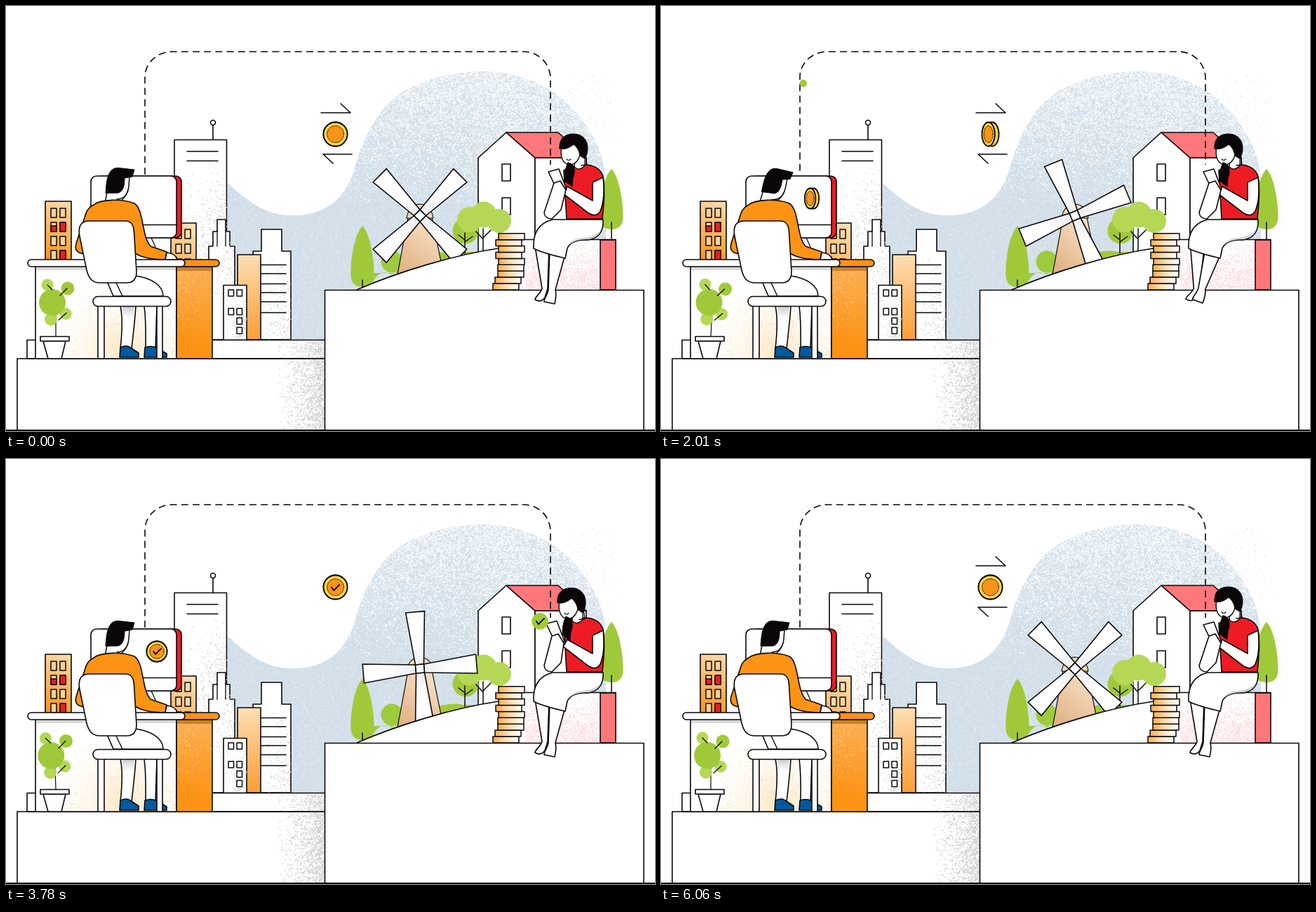
An HTML page with a canvas for the animation above (6.09 s loop, 925 px wide and 605 px high).

```html
<!DOCTYPE html>
<html lang="en">
<head>
<meta charset="utf-8">
<title>Town and country transfer</title>
<style>
html, body { margin: 0; width: 100%; height: 100%; overflow: hidden; background: #fff }
canvas { display: block }
</style>
</head>
<body>
<canvas id="stage" width="925" height="605"></canvas>
<script>
const LOOP = 6090, W = 925, H = 605, TAU = Math.PI * 2;
const INK = '#0b0708', ORANGE = '#fc9314', PEACH = '#fdd9a6', RED = '#ed1c24', PINK = '#ff777b';
const LEAF = '#a0c93a', LIME = '#b4d855', BLUE = '#d3e0ea', SHOE = '#005a9e';
const main = document.getElementById('stage').getContext('2d');
let c = main, seed = 7;

const rnd = () => (seed = seed * 16807 % 2147483647) / 2147483647;

function paint(p, fill, line = 1.6) {
  if (fill) { c.fillStyle = fill; c.fill(p); }
  if (line) { c.lineWidth = line; c.strokeStyle = INK; c.stroke(p); }
}
const path = (d, fill, line) => paint(new Path2D(d), fill, line);
function box(x, y, w, h, fill = '#fff', r = 0, line) {
  const p = new Path2D();
  p.roundRect(x, y, w, h, r);
  paint(p, fill, line);
}
function oval(x, y, rx, ry, fill, line = 0) {
  const p = new Path2D();
  p.ellipse(x, y, rx, ry, 0, 0, TAU);
  paint(p, fill, line);
}
const dot = (x, y, r, fill, line) => oval(x, y, r, r, fill, line);
function fade(x0, y0, x1, y1, ...colors) {
  const g = c.createLinearGradient(x0, y0, x1, y1);
  colors.forEach((col, i) => g.addColorStop(i / (colors.length - 1), col));
  return g;
}
function grain(n, x, y, w, h, color, keep) {
  c.fillStyle = color;
  for (let i = 0; i < n; i++) {
    const u = rnd(), v = rnd(), s = .8 + rnd() * .8;
    if (rnd() < keep(u, v)) c.fillRect(x + u * w, y + v * h, s, s);
  }
}
function group(fn, x = 0, y = 0, deg = 0) {
  c.save();
  c.translate(x, y);
  c.rotate(deg * TAU / 360);
  fn();
  c.restore();
}
const turn = (deg, x, y, fn) => group(() => { c.translate(-x, -y); fn(); }, x, y, deg);
function layer(fn) {
  const cv = document.createElement('canvas');
  cv.width = W; cv.height = H;
  c = cv.getContext('2d');
  c.lineJoin = c.lineCap = 'round';
  fn();
  c = main;
  return cv;
}
// Eased value from a flat list of time, value pairs
function key(t, ...k) {
  if (t <= k[0]) return k[1];
  for (let i = 0; i + 2 < k.length; i += 2) {
    if (t < k[i + 2]) {
      const u = (t - k[i]) / (k[i + 2] - k[i]);
      return k[i + 1] + (k[i + 3] - k[i + 1]) * u * u * (3 - 2 * u);
    }
  }
  return k[k.length - 1];
}

function sky() {
  const cloud = new Path2D('M316 252C345 278 370 298 408 298C450 298 480 280 495 237C508 192 515 180 530 157C555 118 610 93 680 93C740 93 790 120 820 160C845 195 855 220 855 260V404H455V475H316Z');
  c.save();
  c.clip(cloud);
  paint(cloud, BLUE, 0);
  grain(42000, 480, 92, 376, 190, '#fff', (u, v) => .75 * (1 - v) ** 1.2 + .15 * u);
  grain(12000, 316, 252, 540, 223, '#c8d5de', () => .3);
  grain(12000, 316, 252, 540, 223, '#e6eff5', () => .4);
  c.restore();
  grain(160, 800, 98, 72, 95, '#dfe8ef', u => 1 - u * .6);
}

function city() {
  const shade = (x, y, w, h, n) => grain(n, x, y, w, h, '#cfcfcf', (u, v) => u * v);
  const panes = (xs, ys, w, h, fill) => xs.forEach(x => ys.forEach(y => box(x, y, w, h, fill, 0, 1.5)));

  box(56, 278, 37, 84, fade(93, 278, 60, 362, '#fcdcae', '#fbb766', ORANGE));
  panes([64, 77], [288, 308, 328, 348], 8, 13, '#fdd09a');
  [[64, 313, 8, 8], [77, 308, 8, 13], [77, 348, 8, 13]].forEach(r => box(...r, RED, 0, 1.3));

  box(240, 190.5, 74.5, 285);
  shade(252, 225, 62, 170, 2900);
  path('M295 170V190M258 207H302M258 220.5H302');
  dot(295, 166, 3.5, '#fff', 1.6);

  box(235, 309, 36, 60, fade(271, 309, 240, 362, '#fde3be', '#fbb766'));
  panes([242, 255], [318, 339, 360], 8, 13, '#fdd9ae');

  path('M289 475V342H295V321H301V304H313V321H319V342H326V475Z', '#fff');
  shade(296, 306, 29, 120, 800);
  path('M301 321V342M313 321V342', null, 1.3);
  path('M352 475V349H364V318H393V349H406V475Z', '#fff');
  box(330, 354, 33, 121, fade(338, 354, 352, 475, '#fde0b6', '#fbbd72', '#fa9f35'));
  shade(365, 350, 40, 124, 700);
  path('M363 368.5H399M363 381H399M363 395.5H399M363 408H399M363 421H399M363 436.5H399');
  box(310, 397.5, 33, 78);
  shade(312, 400, 30, 74, 350);
  panes([317, 329], [404, 430.5], 7.5, 9, '#fff');
  panes([329], [444, 457.5], 7.5, 9, '#fff');

  box(30, 475.5, 425, 27);
  box(16, 502, 439, 102);
  grain(7000, 378, 476, 76, 127, '#cbcbcb', u => u * u * .75);
  path('M30 502H455');
}

function desk() {
  box(42, 371, 201, 131);
  c.save();
  c.beginPath();
  c.rect(43, 380, 199, 121);
  c.clip();
  const glow = c.createRadialGradient(165, 490, 5, 165, 490, 115);
  glow.addColorStop(0, '#fee9ca');
  glow.addColorStop(1, '#fff0');
  c.fillStyle = glow;
  c.fillRect(43, 380, 199, 121);
  grain(2600, 70, 400, 172, 100, PEACH, (u, v) => u * v * .5);
  c.restore();
  box(43, 371, 199, 5, '#d9d9d9', 0, 0);
  box(243, 371, 51, 131, fade(294, 371, 262, 480, '#fbaf54', ORANGE));
  grain(900, 244, 374, 49, 90, '#fdc077', (u, v) => (1 - u) * (1 - v));
  box(244, 372, 49, 5, '#c9812c', 0, 0);
  box(245, 361, 59, 10, ORANGE, 5);
  box(31, 361, 224, 10, '#fff', 5);
  // Monitor
  box(129, 242, 121, 88, RED, 8);
  path('M207 330L213 343M196 330L203 343', null, 1.3);
  box(121, 242, 122, 88, '#fff', 8);
  path('M121 311.5H243');
  path('M53 477H85L79 502H60Z', '#fff');
  box(49, 470.5, 41, 6.5);
}

function cypress(x, y, h) {
  path(`M${x} ${y}c11 11 17 47 16.5 ${h - 15}q-2 15-16.5 15q-15 0-16.5-15c-1-25 5-60 16.5-${h - 15}Z`, LEAF, 0);
  path(`M${x} ${y + h - 10}v26`, null, 1.5);
}

function country() {
  path('M673 216L713 180L754 216V352H673Z', '#fff');
  box(754, 216, 73, 118);
  path('M713 180H787L827 216H754Z', PINK);
  box(707, 225, 12, 24);
  box(707, 273, 12, 24);
  cypress(508, 313, 87);
  cypress(863, 232, 86);
  dot(550, 364, 15.5, '#9ccb3c', 0);
  path('M520 400Q530 372 550 382L600 356Q635 345 652 350H705V380H520Z', LEAF, 0);
  dot(655, 320, 18.5, LEAF, 0);
  dot(661, 304, 18, LIME, 0);
  dot(681, 297, 18.5, LIME, 0);
  dot(703, 306, 17, LIME, 0);
  path('M654 323V352M654 333L645 326M654 336L665 328M680 317V349M680 332L670 321M680 330L691 319', null, 1.5);
  path('M574 296L558 382L620 364L606 296Z', fade(560, 380, 615, 310, '#dfae80', '#ecc8a3', '#f5e0ca'), 1.2);
  path('M571 302Q574 283 590 282Q606 283 609 302Z', '#f1d6ba', 1.1);
}

function ground() {
  path('M500 404C560 378 640 354 702 345H742V404Z', '#fff', 0);
  path('M500 404C560 378 640 354 702 345', null);
  box(740, 333, 107, 71, '#fff', 0, 0);
  grain(7000, 740, 334, 107, 70, '#ffdadd', (u, v) => v * .6);
  box(847, 333, 22, 71, PINK);
  path('M738 332.5H869');
  box(454.5, 404.5, 454.5, 200);
  box(0, 603, W, 2, INK, 0, 0);
}

function blades(t) {
  const deg = -45 + key(t, 0, 0, 2500, 25, 2850, 25, 5830, 90);
  group(() => {
    for (let i = 0; i < 4; i++) {
      path('M-6 -6L-13.5 -81H13.5L6 -6Z', fade(0, -80, 0, -10, '#fff', '#fff', '#eeeff1'));
      c.rotate(TAU / 4);
    }
    box(-6, -6, 12, 12, '#fff');
  }, 590, 298.5, deg);
}

function plant(t) {
  turn(key(t, 0, 0, 1170, 3, 2010, 3, 3100, -2.5, 3400, -2.4, 5070, 0), 71, 470, () => {
    path('M71 470V436', null, 1.2);
    dot(59, 397, 8.5, LIME, 0);
    dot(88, 402, 9.5, LEAF, 0);
    dot(85, 438, 8.5, LIME, 0);
    dot(64, 446, 9, LIME, 0);
    dot(66, 422, 19, LEAF, 0);
    path('M59 397L66 404M77 412L87 402M75 447L86 437', null, 1.3);
  });
}

function man(t) {
  path('M163 427C167 445 165 470 163 488H179C182 462 184 445 185 427Z', '#fff');
  path('M197 427C200 450 199 470 199 488H213L215 427Z', '#fff');
  grain(0, 0, 0, 0, 0, '#fff', () => 0);
  path('M166 428H183L181 444H167Z', fade(0, 428, 0, 444, '#cfcfcf', '#fff'), 0);
  path('M163 486Q172 482 177 486L189 494V500H162Z', SHOE);
  path('M198 486Q206 483 214 486L229 495V500H197Z', SHOE);
  box(131, 425, 9, 77);
  box(215, 425, 8, 77);
  turn(key(t, 300, 0, 900, -9, 1300, -9, 1850, 7, 2200, 7, 2900, 0), 154, 277, () => {
    path('M146 254L141 281H157C168 276 174 268 175 256L176 243H152Z', '#fff', 1.5);
    path('M158 275Q170 275 174 262', null, 1.3);
    path('M142 266C143 252 144 243 148 237C152 230 158 230 165 231L183 233L180 243L169 245C169 256 167 264 160 266Z', INK, 1);
  });
  path('M125 283C135 275 165 274 183 281C197 290 193 328 206 342L229 350L227 361C210 361 195 359 184 352L172 372L104 351C97 347 99 340 102 332L114 295Q117 287 125 283Z', ORANGE);
  path('M229 351Q242 352 244 361H227Z', '#fff');
  path('M184 384C206 387 224 397 224 413H153L144 392Z', '#fff');
  path('M156 392L166 413', null, 1.4);
  path('M119 306H170C179 306 182 312 182.5 322L186 378C186 388 182 394 172 394H134C123 394 118 388 115 376L105 328C102 312 108 306 119 306Z', '#fff');
  box(124, 413.5, 111, 14, '#fff', 7);
}

function woman(t) {
  const lean = key(t, 2200, 0, 3000, -3, 5150, -3, 5900, 0);
  turn(key(t, 200, 0, 1170, 6.5, 2010, 5, 2900, 0), 763, 348, () =>
    path('M754 342L764 402C763 408 754 414 754 418Q762 423 768 415L772 402L774 345Z', '#fff'));
  turn(key(t, 1100, 0, 2010, 8, 2900, 0), 785, 352, () =>
    path('M775 345L773 403C773 410 766 417 767 421L782 424Q785 412 783 404L798 350Z', '#fff'));
  path('M779 304H851C852 320 846 330 830 333C812 332 803 338 800 345L797 359C785 356 765 352 752 345C751 328 756 310 779 304Z', '#fff');
  path('M801 341Q806 331 822 330Q842 328 849 317Q845 330 830 332Q810 332 801 341Z', '#d3d3d3', 0);
  path('M795 234L806 228L824 226C838 226 848 232 851 243C854 262 852 282 850 303H799Z', RED);
  group(() => {
    path('M811 214L810 229Q817 236 825 227V210Z', '#fff', 1.3);
    path('M792 200C789 215 794 225 803 226Q814 226 818 212L816 195Z', '#fff', 1.4);
    path('M826 212L828 226L820 227', null, 1.4);
    path('M789 203C788 188 797 182 809 182C823 182 830 193 829 204C829 211 826 216 824 217L818 213C817 205 812 199 809 197C803 202 796 205 789 203Z', INK, 1);
    path('M801 223C811 224 812 236 808 245L807 257L796 249C796 240 797 230 801 223Z', INK, 1);
    path('M799 218Q802 221 805 218', null, 1.1);
  }, lean, -lean * .5);
  path('M836 251L851 244C853 262 852 280 847 292Q841 302 829 294L794 267L800 257L836 277Z', '#fff');
  group(() => path('M773 236L788 232L799 261L786 263Z', '#fff'), lean, lean * .5);
  path(`M${781 + lean} 252L767 294Q768 303 778 303L791 290L${798 + lean} 262L${790 + lean} 249Z`, '#fff');
}

function stack(t) {
  const step = key(t, 3800, 8.9, 4230, 11.6, 4750, 8.9);
  [694, 697, 701, 701, 702, 698, 702, 698, 702].forEach((x, i) =>
    box(x, 395 - step * i, 37, 8.9, fade(x, 0, x + 37, 0, '#fbad4c', '#fee0b6', '#fff'), 0, 1.5));
}

function tick(x, y, s, part = 1) {
  group(() => {
    c.setLineDash([17 * part, 40]);
    path(`M${-5 * s} 0L${-2 * s} ${4 * s}L${6 * s} ${-4 * s}`, null, 1.9);
  }, x, y);
}

function coin(t, x, y, r) {
  const a = key(t, 706, 0, 2854, TAU), cos = Math.cos(a), sin = Math.sin(a);
  const w = Math.max(.04, Math.abs(cos)), e = r * .2 * Math.abs(sin) * Math.sign(sin * cos);
  oval(x + e, y, r * w, r, '#fbd54c', 1.8);
  if (Math.abs(e) > .1) {
    box(Math.min(x - e, x + e), y - r, Math.abs(2 * e), 2 * r, '#fbd54c', 0, 0);
    path(`M${x - e} ${y - r}H${x + e}M${x - e} ${y + r}H${x + e}`);
  }
  oval(x - e, y, r * w, r, '#fbd54c', 1.8);
  c.setLineDash([1.5, 1.5]);
  oval(x - e, y, r * w * .7, r * .7, '#f99418', 1);
  c.setLineDash([]);
  const part = key(t, 2880, 0, 3150, 1, 3800, 1, 4050, 0);
  if (part > 0) tick(x, y, r / 15, part);
}

function arrows(t) {
  const off = key(t, 250, 0, 700, 60, 700, -60, 1371, 0, 3090, 0, 3694, 60, 3694, -60, 4200, 0);
  const arrow = (x, w, d, dx) => {
    c.save();
    c.beginPath();
    c.rect(x, 130, w, 105);
    c.clip();
    c.translate(dx, 0);
    path(d);
    c.restore();
  };
  arrow(441, 59, 'M449 152H491L477 139', off);
  arrow(443, 59, 'M493 211H452L466 224', -off);
}

const route = document.createElementNS('http://www.w3.org/2000/svg', 'path');
route.setAttribute('d', 'M198 240V150C198 100 215 65 260 65H715C760 65 776 90 776 130V200Q776 231 761 231');
const routeLength = route.getTotalLength();

function wire(t) {
  c.setLineDash([10, 6.2]);
  c.lineDashOffset = -key(t, 1600, 0, 3200, 32.4);
  c.lineCap = 'butt';
  path('M198 240V101A39 36 0 0 1 237 65H738A38 38 0 0 1 776 103V226');
  c.lineCap = 'round';
  c.setLineDash([]);
  c.lineDashOffset = 0;
}

function ball(t) {
  const speck = t > 3150 ? key(t, 3150, 5, 3390, 0) : 0;
  if (speck > 0) dot(259, 65, speck, LEAF, 0);
  const r = key(t, 1860, 0, 2180, 11.5, 4450, 11.8, 4780, 0);
  if (r <= 0) return;
  const p = route.getPointAtLength(routeLength * key(t, 1440, 0, 3786, 1));
  dot(p.x, p.y, r, LEAF, 0);
  const part = key(t, 2180, 0, 2450, 1);
  if (part > 0) tick(p.x, p.y, r / 11.5, part);
}

const back = layer(() => { sky(); city(); desk(); country(); });
const front = layer(ground);
main.lineJoin = main.lineCap = 'round';

function frame() {
  const t = performance.now() % LOOP;
  c.fillStyle = '#fff';
  c.fillRect(0, 0, W, H);
  c.drawImage(back, 0, 0);
  blades(t);
  c.drawImage(front, 0, 0);
  wire(t);
  plant(t);
  const size = key(t, 300, 0, 700, 14.5, 5300, 14.5, 5700, 0);
  if (size > .2) coin(t, 215, 274, size);
  man(t);
  stack(t);
  woman(t);
  coin(t, 469.5, 182.5, 17);
  arrows(t);
  ball(t);
  requestAnimationFrame(frame);
}
frame();
</script>
</body>
</html>
```
